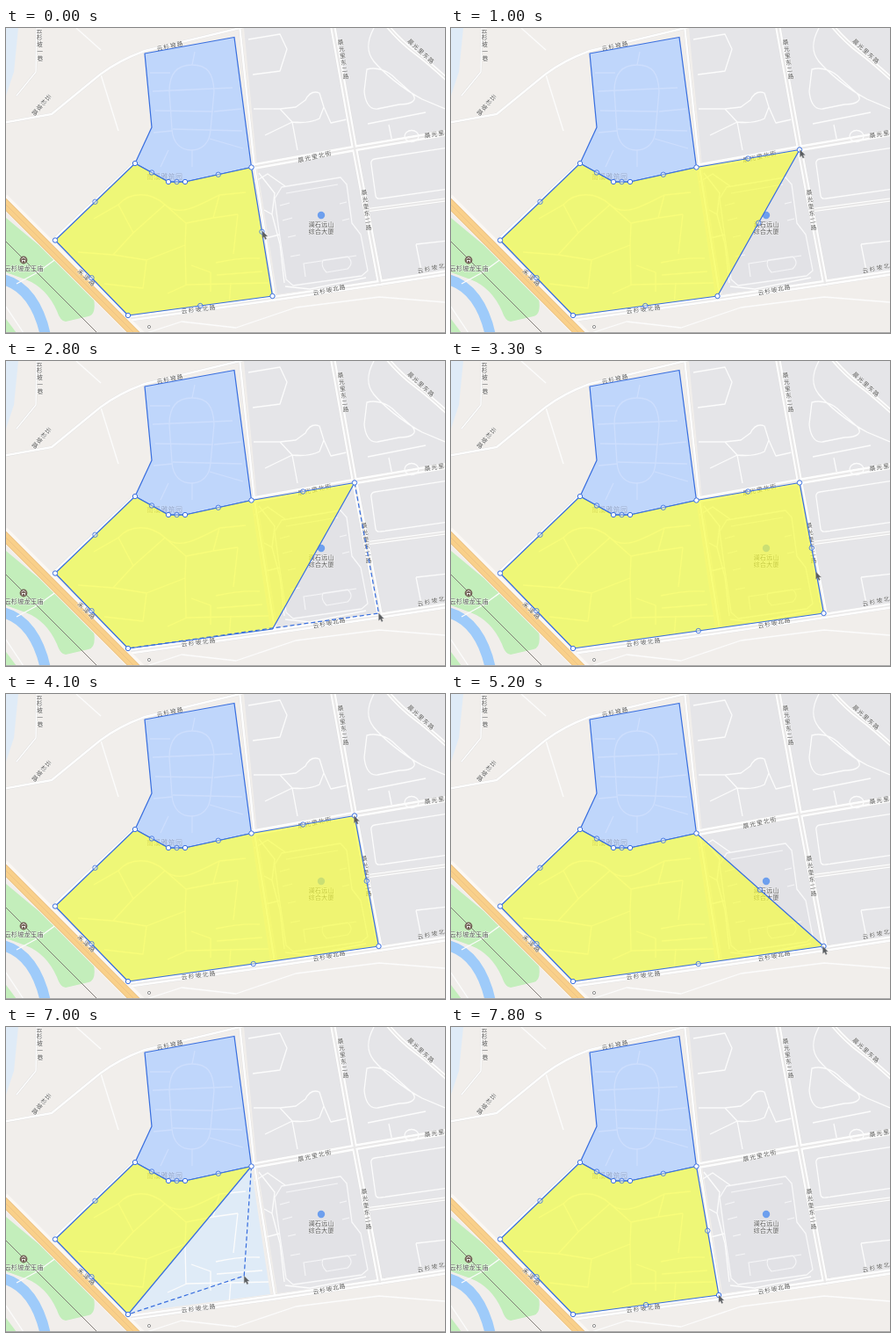
An HTML page that plays this animation: 500x347 px, repeating every 7900 ms.

```html
<!DOCTYPE html>
<html lang="zh">
<head>
<meta charset="utf-8">
<title>Polygon editing</title>
<style>
  html, body { margin: 0; width: 100%; height: 100%; overflow: hidden; background: #f1eeeb; }
  svg { display: block; width: 500px; height: 347px; }
  path, polygon, polyline { stroke-linejoin: round; }
  #streets path { fill: none; stroke-linecap: round; }
  .lane { fill: none; stroke: #fcfcfc; stroke-width: 1.3; }
  .highway { fill: none; }
  #labels { font-family: "Noto Sans CJK SC", "Noto Sans CJK", "Noto Sans", sans-serif;
    stroke: #fff; stroke-width: 1; stroke-opacity: .6; paint-order: stroke; }
  .outline { stroke: #3a70df; stroke-width: 1.25; }
  #yellow { fill: rgba(247, 254, 60, .68); }
  #blue { fill: rgba(160, 193, 255, .5); }
  #preview { fill: none; stroke-dasharray: 5 3; }
  #handles circle { fill: #fff; stroke: #3a70df; stroke-width: 1; }
  #handles .mid { fill-opacity: .35; stroke-opacity: .85; }
</style>
</head>
<body>
<svg viewBox="0 0 500 347">
  <rect width="500" height="347" fill="#f1eeeb"/>

  <!-- land -->
  <path d="M0 0H14L9 50 0 77Z" fill="#dfebf7"/>
  <path d="M271 0H500V276L425 287 309 303 286 158Z" fill="#e5e5e8"/>
  <path d="M158 29L260 11 279 158 301 304 141 325 60 241 147 154 166 113Z" fill="#dfebf7"/>
  <path d="M0 216L30 241 58 263 100 308Q103 326 94 328L68 334Q62 334 58 322 46 295 22 286L0 278Z" fill="#c3eebb"/>
  <path d="M0 331L12 347H0Z" fill="#c3eebb"/>
  <path d="M-4 286C22 292 38 317 45 350" fill="none" stroke="#9ecbfa" stroke-width="12"/>
  <path d="M0 317L20 347M12 291L36 278 58 262" class="lane" stroke-width="2"/>
  <path d="M0 243L104 347" fill="none" stroke="#77716c" stroke-width=".9"/>

  <!-- side lanes -->
  <g class="lane">
    <path d="M186 72C186 52 194 42 212 42S236 52 237 72L233 116C232 132 222 139 211 139S190 132 189 115Z"/>
    <path d="M164 51H187M170 94L236 95M167 72L258 68M237 95L268 92M190 115L269 117M168 119L189 117M212 139V158M212 42L215 27M185 139L176 158M232 126L270 137"/>
    <path d="M128 201C142 185 166 187 181 201S216 204 243 190M100 217L128 201 145 233 122 258 82 255M145 233L181 201 205 222 236 216 264 212M205 222L204 247 160 264 122 258M160 264L156 296 112 291M205 293L204 247M236 216L243 190 273 187"/>
    <path d="M264 212L259 257M211 270L233 278V300M239 267Q265 261 289 262M240 281L292 277M184 302L206 292 299 290M256 290L254 316"/>
    <path d="M276 13L312 7 320 24 312 49 281 53M282 92H312L326 107Q345 109 357 103L362 90 357 74Q347 70 341 82L330 90 312 92M295 122L326 107 332 139M362 90L370 108 388 104"/>
    <path d="M419 0C411 15 410 27 419 38S451 69 474 81L500 92M411 47C422 44 435 48 444 58L462 74C471 83 460 87 448 87L423 92C413 93 409 83 408 72ZM412 109L478 96M436 110L440 130"/>
    <path d="M504 136L420 149Q415 150 416 155L421 191Q422 195 427 194L504 183M467 246L504 242M467 246L473 276"/>
    <path d="M288 165L306 188 303 212 312 246 317 290M283 175L298 166 318 180M294 207L303 212M296 239L312 235M318 294L346 297 410 284"/>
    <path d="M160 347L200 334 262 341 330 318 425 306 500 312M80 0L108 25M108 53L128 117"/>
  </g>
  <path d="M314 181L381 170 388 178 394 222 404 235 412 276 405 282 327 293 319 286 311 231 306 194Z" fill="#e2e2e6" stroke="#f9f9fa" stroke-width="1.3"/>
  <path d="M319 188L378 178M323 199L312 202M326 216L315 219M321 238L330 236M324 260L335 258M341 283L339 268 399 259M361 264L389 260Q397 267 389 274L365 278Q358 271 361 264ZM388 198L380 200M391 217L383 219" fill="none" stroke="#f6f6f8" stroke-width="1.1"/>

  <!-- streets -->
  <g id="streets"></g>
  <g class="highway">
    <path d="M-4 195L154 353" stroke="#fbf8f4" stroke-width="15"/>
    <path d="M-4 197L152 353" stroke="#ebc184" stroke-width="10.5"/>
    <path d="M-4 197L152 353" stroke="#f9d08a" stroke-width="8.8"/>
    <path d="M-4 197L152 353" stroke="#ebc184" stroke-width=".8"/>
  </g>
  <ellipse cx="462" cy="123" rx="8" ry="6.5" class="lane"/>

  <!-- places -->
  <circle cx="359" cy="213" r="4.2" fill="#6d9fee"/>
  <circle cx="20" cy="264" r="4.4" fill="#736357"/>
  <path d="M17.5 263L20 261 22.5 263M18 264.5H22M18.5 264V266.5M21.5 264V266.5" fill="none" stroke="#fff" stroke-width=".8"/>
  <circle cx="163" cy="340" r="1.6" fill="#fff" stroke="#777" stroke-width=".8"/>
  <g id="labels"></g>

  <!-- editor -->
  <polygon id="blue" class="outline" points="158,29 260,10.5 279.5,158.5 204,175 185,175 147,154 166,113"/>
  <polygon id="yellow" class="outline"/>
  <polyline id="preview" class="outline"/>
  <g id="handles"></g>
  <path id="cursor" d="M0 0V8.2L1.9 6.5 3.3 9.5 4.7 8.9 3.4 5.9H5.8Z" fill="#5a5d60" stroke="#8e9092" stroke-width=".4"/>
  <path d="M0 346.5H500" stroke="#a9a9a9"/>
</svg>
<script>
const $ = id => document.getElementById(id);
const LOOP = 7900, STEP = 100;

function add(parent, tag, attrs, text) {
  const node = document.createElementNS("http://www.w3.org/2000/svg", tag);
  for (const name in attrs) node.setAttribute(name, attrs[name]);
  if (text) node.textContent = text;
  parent.append(node);
  return node;
}

// Path, width and, for dual carriageways, the width of the median.
const streets = [
  ["M-4 108L52 98 107 53Q128 37 158 26L275 -2", 2.5],
  ["M35 -3L34 50 12 77", 1.5],
  ["M147 153L55 240", 3],
  ["M266 -3L283 158 306 305", 2.5],
  ["M280 158L397 137 504 119", 7, 2.2],
  ["M372 -3L397 137 426 290", 6.5, 2.2],
  ["M138 331L303 308 425 290 504 278", 6.5, 1.5],
  ["M433 -4Q449 15 465 27T504 60", 5, 1.5],
  ["M413 207L504 195", 4.5, 1.8]
];
const strokes = [["#dedddd", w => w + .7], ["#fdfdfd", w => w], ["#e9e8e8", (w, median) => median]];
for (const [stroke, widthOf] of strokes)
  for (const [d, width, median = 0] of streets)
    add($("streets"), "path", { d, stroke, "stroke-width": widthOf(width, median) });

// Spreads characters between the centres of the first and the last one.
function label(text, x1, y1, x2, y2, rotate = 0, size = 6.8, fill = "#5a5a59") {
  const a = rotate * Math.PI / 180, dx = -size / 2, dy = size * .37;
  const ox = dx * Math.cos(a) - dy * Math.sin(a), oy = dx * Math.sin(a) + dy * Math.cos(a);
  const spread = (from, to, offset) => [...text].map((_, i) =>
    (from + (to - from) * i / (text.length - 1) + offset).toFixed(2)).join(" ");
  add($("labels"), "text",
    { x: spread(x1, x2, ox), y: spread(y1, y2, oy), rotate, "font-size": size, fill }, text);
}
label("云杉坡路", 175, 23, 198, 18, -12);
label("云杉坡一巷", 38, 2, 39, 34);
label("云杉坡路", 48, 79, 33, 96, 40);
label("晨光里东二路", 381, 16, 387, 55, -8);
label("晨光里东二路", 408, 187, 413, 227, -8);
label("晨光里东路", 461, 16, 484, 37, 42);
label("晨光里北街", 336, 150, 367, 143, -11);
label("晨光里北街", 480, 122, 511, 117, -8);
label("云杉坡北路", 203, 322, 235, 318, -8);
label("云杉坡北路", 353, 301, 383, 295, -9);
label("云杉坡北路", 472, 276, 504, 269, -10);
label("禾泽路", 85, 278, 98, 290, 45);
label("云杉坡龙王庙", 2, 273, 39, 273, 0, 7.2);
label("南溪雅筑园", 164, 169, 197, 169, 0, 8, "#8f9298");
label("澜石远山", 348, 223, 370, 223, 0, 7.2);
label("综合大厦", 348, 231, 370, 231, 0, 7.2);

const west = [139, 327], joint = [279.5, 158.5];
const south = [303.5, 305], east = [397, 138.5], corner = [424.5, 287], restored = [305, 305];
const base = [west, [56, 241.5], [147, 154], [185, 175], [204, 175], joint];

// Vertices that follow the fixed ones, from the given time on.
const shapes = [
  [0, [south]], [1000, [east, south]], [3000, [east, corner]],
  [4300, [corner]], [5400, []], [7500, [restored]]
];
const drags = [
  { from: 200, to: 1000, ends: [joint, south] },
  { from: 2000, to: 3000, ends: [east, west], vertex: south },
  { from: 6600, to: 7500, ends: [joint, west] }
];
const cursorPath = [
  [0, 292, 231], [100, 292, 231], [800, 397, 138.5], [1000, 397.5, 138.5],
  [1800, 303.5, 305], [1950, 303.5, 305], [2700, 424.5, 287], [3000, 424.5, 287],
  [3800, 396.5, 138.5], [4300, 396.5, 138.5], [4900, 423.5, 287], [5400, 423.5, 287],
  [5900, 178, 242], [6000, 178, 242], [6400, 209, 243], [6550, 209, 243],
  [7300, 305, 305], [7900, 305, 305]
];

function cursorAt(t) {
  const i = cursorPath.findIndex(key => key[0] > t);
  const [t0, x0, y0] = cursorPath[i - 1], [t1, x1, y1] = cursorPath[i];
  const p = (t - t0) / (t1 - t0), e = p * p * (3 - 2 * p);
  return [x0 + (x1 - x0) * e, y0 + (y1 - y0) * e];
}

function drawHandles(ring, drag) {
  $("handles").replaceChildren();
  const handle = (x, y, cls) => add($("handles"), "circle", { cx: x, cy: y, r: 2.7, class: cls });
  ring.forEach((a, i) => {
    const b = ring[(i + 1) % ring.length];
    const moving = drag && (drag.vertex
      ? a === drag.vertex || b === drag.vertex
      : drag.ends.includes(a) && drag.ends.includes(b));
    if (!moving) handle((a[0] + b[0]) / 2, (a[1] + b[1]) / 2, "mid");
  });
  for (const p of ring) if (!drag || p !== drag.vertex) handle(...p, "vertex");
}

let shown = -1;
function frame(now) {
  const t = Math.floor(now % LOOP / STEP) * STEP;
  if (t !== shown) {
    shown = t;
    const ring = base.concat(shapes.filter(([start]) => start <= t).pop()[1]);
    const drag = drags.find(d => t >= d.from && t < d.to);
    const tip = cursorAt(t);
    $("yellow").setAttribute("points", ring.join(" "));
    $("preview").setAttribute("points", drag ? [drag.ends[0], tip, drag.ends[1]].join(" ") : "");
    $("cursor").setAttribute("transform", `translate(${tip})`);
    drawHandles(ring, drag);
  }
  requestAnimationFrame(frame);
}
frame(0);
</script>
</body>
</html>
```
